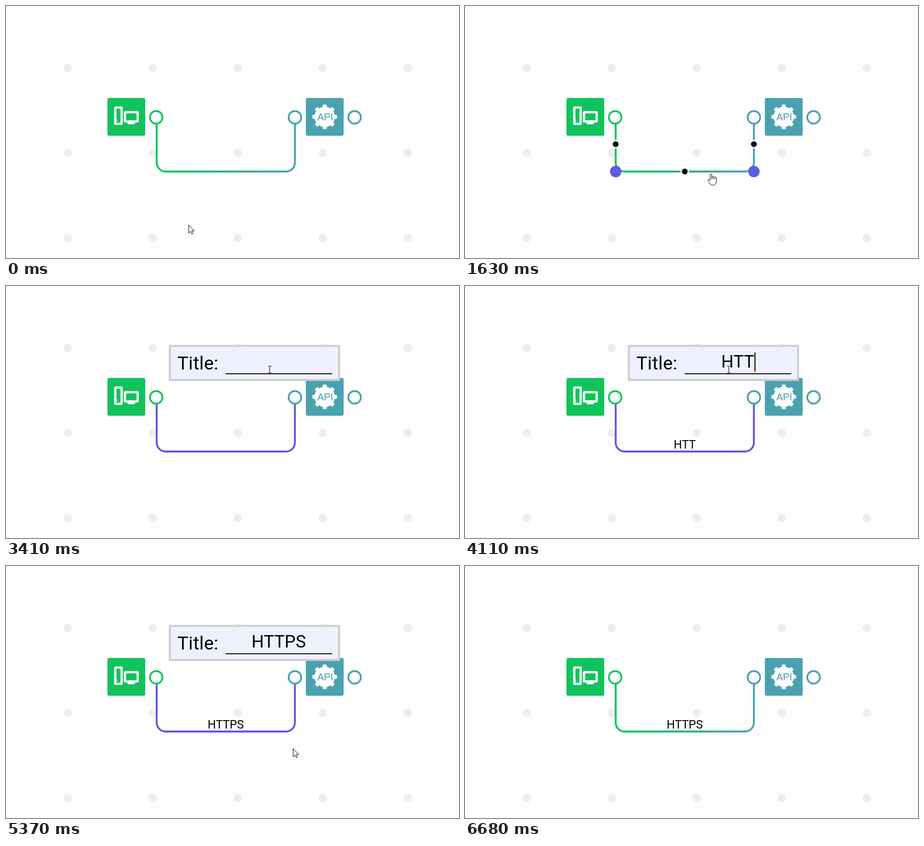
Write an HTML page that moves like this. It is 911 px wide and 507 px high and loops after 6780 ms.

```html
<!DOCTYPE html>
<html lang="en">
<head>
<meta charset="utf-8">
<title>Connector title</title>
<style>
  html, body { margin: 0; width: 100%; height: 100%; overflow: hidden; background: #fefefe; }
  svg { display: block; width: 100vw; height: 100vh; }
  text { font-family: Roboto, sans-serif; }
  .white { fill: #fefefe; }
  .green { stroke: #10c45c; }
  .teal { stroke: #4aa2b0; }
  .port { fill: #fefefe; stroke-width: 3.6; }
  .knob { fill: #5f5adf; }
  .mid { fill: #000; stroke: #f1f1fd; stroke-width: 3; }
  .cursor { fill: #fff; stroke: #000; stroke-linejoin: round; }
</style>
</head>
<body>
<svg viewBox="0 0 911 507">
  <defs>
    <linearGradient id="blend" gradientUnits="userSpaceOnUse" x1="303" y1="0" x2="581" y2="0">
      <stop offset="0" stop-color="#10c45c"/>
      <stop offset="1" stop-color="#4aa2b0"/>
    </linearGradient>
    <pattern id="dots" patternUnits="userSpaceOnUse" x="38.5" y="39" width="171" height="171">
      <circle cx="85.5" cy="85.5" r="8.6" fill="#eee"/>
    </pattern>
  </defs>
  <rect x="100" y="100" width="730" height="390" fill="url(#dots)"/>

  <path id="line" d="M303 236V315A18 18 0 0 0 321 333H563A18 18 0 0 0 581 315V236" fill="none" stroke-width="3.8"/>

  <g id="handles">
    <circle class="knob" cx="303" cy="333" r="11.5"/>
    <circle class="knob" cx="581" cy="333" r="11.5"/>
    <circle class="mid" cx="303" cy="278" r="7.3"/>
    <circle class="mid" cx="442" cy="333" r="7.3"/>
    <circle class="mid" cx="581" cy="278" r="7.3"/>
  </g>

  <rect x="204" y="185" width="76" height="76" rx="3.5" fill="#10c45c"/>
  <g fill="none" stroke="#fefefe" stroke-width="4.5">
    <rect x="219.8" y="204.3" width="12.7" height="32.6" rx="1"/>
    <rect x="239.2" y="213.7" width="25.6" height="18.6" rx="1"/>
  </g>
  <rect class="white" x="244.5" y="233" width="15" height="5" rx="2"/>
  <circle class="white" cx="222" cy="229.5" r="1.8"/>

  <rect x="603" y="185" width="76" height="76" rx="3.5" fill="#4aa2b0"/>
  <g id="gear" class="white" transform="translate(641 223)"><circle r="20.5"/></g>
  <text x="642" y="230" font-size="20" text-anchor="middle" fill="#4aa2b0" style="font-family:'Liberation Sans',Arial,sans-serif">API</text>

  <circle class="port green" cx="302" cy="224" r="12.6"/>
  <circle class="port teal" cx="581" cy="224" r="12.6"/>
  <circle class="port teal" cx="701" cy="224" r="12.6"/>

  <text id="label" x="442" y="327" font-size="23.3" text-anchor="middle"></text>

  <g id="popup">
    <rect x="329.5" y="120.5" width="340.3" height="68.5" fill="#eef1fd" stroke="#ccc" stroke-width="3.8"/>
    <text x="344.8" y="168" font-size="36.7" letter-spacing=".4">Title:</text>
    <rect x="441.5" y="175.6" width="214.5" height="1.9"/>
    <text id="input" x="548.5" y="164" font-size="35" text-anchor="middle"></text>
    <rect id="caret" y="134" width="2" height="38"/>
  </g>

  <g id="arrow" class="cursor">
    <path d="M.5 .6V17L4.2 13.5 6.6 18.8 9 17.8 6.7 12.4H11.7Z"/>
  </g>
  <g id="hand" class="cursor">
    <path d="M-1 14V2.2a1.6 1.6 0 0 1 3.2 0V7.2a1.6 1.6 0 0 1 3.1 .4a1.6 1.6 0 0 1 3.1 .7a1.5 1.5 0 0 1 3 .8V15C11.4 20 9 23.5 4.5 23.5C.5 23.5 -1.2 21 -2.8 18L-5.3 14C-6 12.3 -4 11.3 -2.8 12.3Z"/>
    <path d="M2.2 7V11.5M5.3 7.6V11.5M8.4 8.3V11.5" fill="none"/>
  </g>
  <g id="beam" class="cursor">
    <path d="M-3.5 -7H-1L0 -6 1 -7H3.5M0 -6V6M-3.5 7H-1L0 6 1 7H3.5" fill="none"/>
  </g>
</svg>
<script>
const LOOP = 6780;
const $ = id => document.getElementById(id);
const show = (id, on) => $(id).setAttribute('visibility', on ? 'inherit' : 'hidden');
const within = (v, a, b) => v >= a && v < b;

for (let a = 0; a < 360; a += 45) {
  $('gear').insertAdjacentHTML('beforeend',
    `<rect x="-4" y="-24.8" width="8" height="10" rx="1.8" transform="rotate(${a})"/>`);
}

// Pointer hotspot: time, x, y
const path = [
  [370, 367, 440], [1060, 491, 349], [1200, 494, 337],
  [2080, 494, 337], [2440, 522, 246], [2750, 530.5, 169], [2810, 530.5, 168],
  [5009, 530.5, 168], [5010, 522.5, 171], [5150, 519, 250], [5290, 550, 333], [5430, 588, 378],
  [5770, 588, 378], [5860, 595, 392], [6320, 838, 508], [6400, 900, 545]
];
const typed = [3880, 4000, 4110, 4360, 4450];

const slope = (i, k) => (path[i + 1][k] - path[i][k]) / (path[i + 1][0] - path[i][0]);

// Monotone tangent: smooth through a key, still at turns and rests
function tangent(i, k) {
  if (i === 0 || i === path.length - 1) return 0;
  const a = slope(i - 1, k), b = slope(i, k);
  return a * b > 0 ? 2 * a * b / (a + b) : 0;
}

function pointer(t, k) {
  if (t <= path[0][0]) return path[0][k];
  const i = path.findIndex(p => p[0] > t) - 1;
  if (i < 0) return path[path.length - 1][k];
  const d = path[i + 1][0] - path[i][0], u = (t - path[i][0]) / d, v = 1 - u;
  return v * v * (1 + 2 * u) * path[i][k] + u * u * (3 - 2 * u) * path[i + 1][k]
    + d * u * v * (v * tangent(i, k) - u * tangent(i + 1, k));
}

function draw(t) {
  const x = pointer(t, 1), y = pointer(t, 2);
  const open = within(t, 1720, 5550);
  const hover = within(x, 303, 581) && Math.abs(y - 333) < 14;
  const editing = open && within(x, 441, 656) && within(y, 134, 178);
  const kind = hover ? 'hand' : editing ? 'beam' : 'arrow';

  $('line').setAttribute('stroke', within(t, 1720, 5770) ? '#5f5adf' : 'url(#blend)');
  show('handles', hover);
  show('popup', open);

  const word = 'HTTPS'.slice(0, typed.filter(at => t >= at).length);
  $('label').textContent = $('input').textContent = word;
  const width = word ? $('input').getComputedTextLength() : 0;
  $('caret').setAttribute('x', 548.9 + width / 2);
  show('caret', open && (within(t, 2870, 3410) || within(t, 3880, 5010)));

  for (const id of ['arrow', 'hand', 'beam']) show(id, id === kind && t < 6320);
  $(kind).setAttribute('transform', `translate(${x} ${y})`);
}

const start = performance.now();
function tick() {
  draw((performance.now() - start) % LOOP);
  requestAnimationFrame(tick);
}
tick();
</script>
</body>
</html>
```
